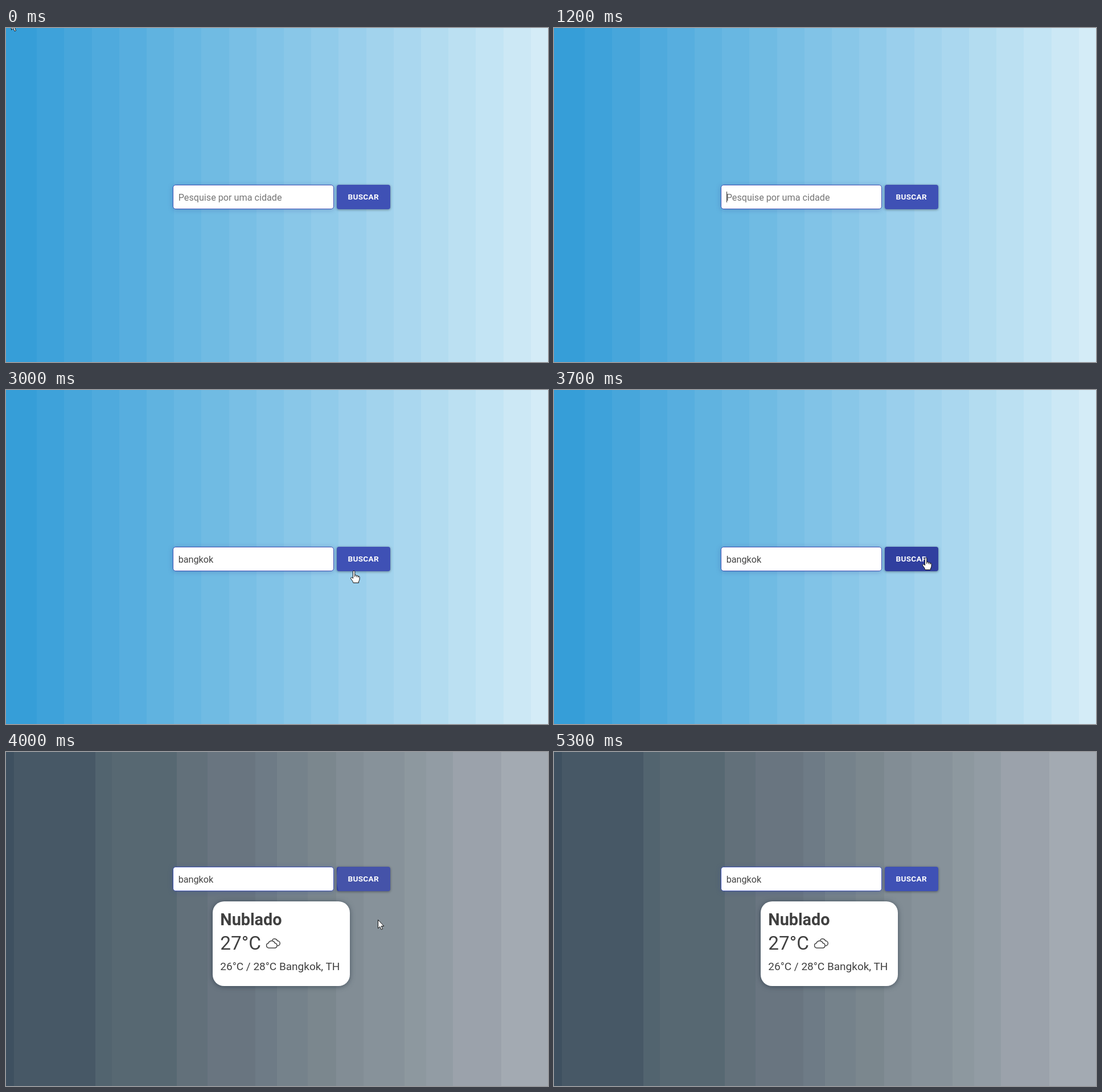
An HTML page for the animation above (5.65 s loop, 952 by 588 pixels).

```html
<!DOCTYPE html>
<html lang="pt">
<head>
<meta charset="utf-8">
<style>
  html, body { margin: 0; width: 100%; height: 100%; overflow: hidden; }
  svg { display: block; width: 952px; height: 588px; font-family: Roboto, sans-serif; }
  #field { fill: #fff; stroke: #3f51b5; filter: drop-shadow(0 1px 4px rgba(45, 70, 150, .35)); }
  #buttonBox { filter: drop-shadow(0 1px 2px rgba(0, 0, 0, .4)); }
  #card { fill: #404040; }
  #cardBox { fill: #fff; filter: drop-shadow(0 1px 5px rgba(25, 40, 55, .55)); }
  #icon { fill: none; stroke: #444; stroke-width: 1.5; stroke-linecap: round; }
  #arrow, #hand { fill: #fff; stroke: #111; stroke-linejoin: round; }
  #beam { fill: none; stroke: #fff; stroke-width: 1.3; }
</style>
</head>
<body>
<svg viewBox="0 0 952 588">
  <clipPath id="buttonClip"><rect x="581" y="276" width="94" height="43" rx="4"/></clipPath>
  <g id="day"></g>
  <g id="cloudy"></g>
  <g id="form">
    <rect id="field" x="293.5" y="276.5" width="282" height="42" rx="4.5"/>
    <text id="query" x="302.7" y="303.5" font-size="16.2"></text>
    <rect id="caret" y="288" width="1" height="19" fill="#333"/>
    <rect id="buttonBox" x="581" y="276" width="94" height="43" rx="4"/>
    <g clip-path="url(#buttonClip)"><circle id="ripple" cx="653" cy="297" fill="#fff"/></g>
    <text x="627.7" y="302" font-size="13.6" font-weight="600" letter-spacing=".3" text-anchor="middle" fill="#fff">BUSCAR</text>
  </g>
  <g id="card">
    <rect id="cardBox" x="363" y="263" width="241" height="149" rx="20"/>
    <text x="376.3" y="304.5" font-size="28.8" font-weight="700">Nublado</text>
    <text x="376.3" y="348" font-size="33.3">27°C</text>
    <text x="376.3" y="383.7" font-size="19">26°C / 28°C Bangkok, TH</text>
    <g id="icon">
      <path d="M461.5 344.9a4.2 4.2 0 0 1-.6-8.3a6 6 0 0 1 11.4 0a4.2 4.2 0 0 1 .2 8.3z"/>
      <path d="M467.5 331.2a5.2 5.2 0 0 1 9.3 1.3a4.2 4.2 0 0 1 .2 8.6"/>
    </g>
  </g>
  <g id="pointer">
    <path id="arrow" d="M.5 .5V15.5L3.8 12.4L6.1 17.6L8.5 16.6L6.2 11.5H10.8Z"/>
    <path id="beam" d="M-3.5 -8H3.5M0 -8V8M-3.5 8H3.5"/>
    <path id="hand" d="M-1.5 13V1.8a1.6 1.6 0 0 1 3.2 0V8q3-.8 3.2.8q2.5-.6 2.7 1q2.4-.4 2.4 1.5V15q0 2.200-1.500 4V21.500H-1Q-1.500 18.500-5 14.800q-1.200-2.600.8-3q1.500 0 2.700 2zM1.700 8v3M4.900 9v2.500M7.600 10v2" />
  </g>
</svg>
<script>
const LOOP = 5650, RESULT = 4000;
const $ = id => document.getElementById(id);
const clamp = v => Math.max(0, Math.min(1, v));
const mix = (a, b, k) => a + (b - a) * k;
const blend = (a, b, k) => `rgb(${a.map((v, i) => Math.round(mix(v, b[i], k)))})`;
const show = (id, on) => $(id).setAttribute('visibility', on ? 'visible' : 'hidden');
const set = (id, attrs) => { for (const k in attrs) $(id).setAttribute(k, attrs[k]); };

// each band runs from its own left edge to the right side of the stage
const band = (x, color) =>
  `<rect x="${x}" width="${952 - x}" height="588" fill="${color}" shape-rendering="crispEdges"/>`;

$('day').innerHTML = Array.from({ length: 20 }, (_, i) =>
  band(i ? Math.round(6 + i * 48.2) : 0, blend([54, 158, 216], [212, 236, 247], i / 19))).join('');

$('cloudy').innerHTML = [
  [0, '#3e5060'], [14, '#475866'], [157, '#52646f'], [186, '#576872'], [300, '#62707a'],
  [354, '#697580'], [438, '#6e7b86'], [476, '#75828b'], [530, '#7b878e'], [580, '#828d95'],
  [628, '#87929a'], [700, '#8d989f'], [738, '#929ca4'], [785, '#9ba2ab'], [870, '#a3aab2']
].map(b => band(...b)).join('');

// time, x, y
const route = [
  [250, 9, -12], [650, 356, 298], [750, 356, 298], [900, 343, 299],
  [2700, 343, 299], [3000, 611, 318], [3050, 611, 318], [3250, 653, 295],
  [4700, 653, 295], [5300, 90, -20], [LOOP, 90, -20]
];
function pointerAt(t) {
  if (t <= route[0][0]) return route[0].slice(1);
  const i = route.findIndex(p => p[0] >= t);
  const [t0, x0, y0] = route[i - 1], [t1, x1, y1] = route[i];
  const u = (t - t0) / (t1 - t0), k = u * u * (3 - 2 * u);
  return [mix(x0, x1, k), mix(y0, y1, k)];
}

const keyTimes = [1450, 1600, 1700, 1800, 2050, 2150, 2300];

function drawForm(t) {
  const typed = 'bangkok'.slice(0, keyTimes.filter(k => t >= k).length);
  $('query').textContent = typed || 'Pesquise por uma cidade';
  set('query', { fill: typed ? '#444' : '#757575' });
  const width = typed ? $('query').getComputedTextLength() : 0;
  set('caret', { x: Math.round(302.7 + width) });
  show('caret', t >= 1200 && t < 2800);

  const leaving = clamp((t - RESULT) / 250);
  const hover = clamp((t - 3050) / 250) * (1 - leaving);
  set('buttonBox', { fill: blend([63, 81, 181], [48, 63, 159], hover) });
  const u = clamp((t - 3700) / 550);
  set('ripple', {
    r: 91 * (1 - (1 - u) ** 2),
    opacity: t < RESULT ? .16 : .1 * (1 - leaving)
  });
}

function drawPointer(t) {
  const [x, y] = pointerAt(t);
  const inRow = y > 276 && y < 319 && t < 3900;
  const shape = inRow && x > 293 && x < 576 ? 'beam' : inRow && x > 580 && x < 675 ? 'hand' : 'arrow';
  const visible = t < 950 || t >= 2750;
  for (const id of ['arrow', 'beam', 'hand']) show(id, visible && id === shape);
  set('pointer', { transform: `translate(${Math.round(x)} ${Math.round(y)})` });
}

function draw(now) {
  const t = Math.floor((now % LOOP) / 50) * 50;
  const result = t >= RESULT;
  show('day', !result);
  show('cloudy', result);
  show('card', result);
  set('form', { transform: `translate(0 ${result ? -74 : 0})` });
  drawForm(t);
  drawPointer(t);
}

const start = performance.now();
function tick() {
  draw(performance.now() - start);
  requestAnimationFrame(tick);
}
tick();
</script>
</body>
</html>
```
